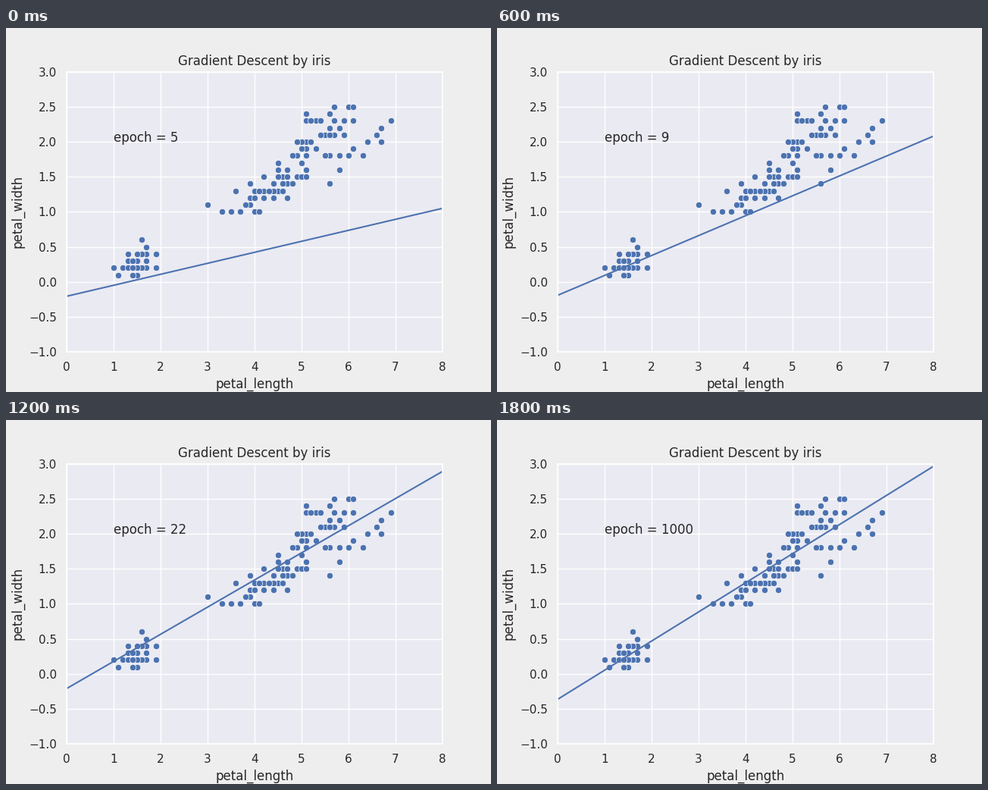
Recreate the animation shown at these times as a matplotlib script. Size 640 by 480 pixels, loop 2000 ms.

```python
import matplotlib.pyplot as plt
from matplotlib.animation import FuncAnimation

INK = "0.15"
BLUE = "#4C72B0"

plt.rcParams.update({
    "font.family": "DejaVu Sans",
    "font.size": 12,
    "axes.titlesize": 12,
    "axes.labelsize": 12,
    "xtick.labelsize": 11,
    "ytick.labelsize": 11,
    "text.color": INK,
    "axes.labelcolor": INK,
    "xtick.color": INK,
    "ytick.color": INK,
    "axes.facecolor": "#EAEAF2",
    "axes.edgecolor": "white",
    "axes.linewidth": 1.25,
    "axes.axisbelow": True,
    "axes.grid": True,
    "grid.color": "white",
    "grid.linestyle": "-",
    "grid.linewidth": 1,
    "lines.solid_capstyle": "round",
    "xtick.bottom": False,
    "ytick.left": False,
    "xtick.major.size": 6,
    "ytick.major.size": 6,
})

# Petal width -> petal lengths, both in tenths, in drawing order.
ROWS = {
    1: [11, 15, 14],
    2: [17, 10, 19, 12, 13, 16, 15, 14],
    3: [17, 15, 13, 14],
    4: [17, 13, 16, 15, 19],
    5: [17],
    6: [16],
    10: [40, 41, 35, 37, 33],
    11: [39, 38, 30],
    12: [47, 39, 44, 40, 42],
    13: [45, 46, 36, 44, 40, 42, 43, 41],
    14: [39, 47, 44, 48, 46, 56],
    15: [46, 42, 49, 45, 47, 50, 51],
    16: [47, 51, 45, 58],
    17: [50, 45],
    18: [56, 63, 58, 60, 49, 55, 48, 51],
    19: [53, 61, 51, 50],
    20: [51, 50, 49, 67, 64, 52],
    21: [59, 66, 55, 57, 56, 54],
    22: [58, 67, 56],
    23: [53, 69, 57, 61, 51, 59, 52, 54],
    24: [51, 56],
    25: [60, 61, 57],
}
EPOCHS = [5, 6, 7, 9, 14, 17, 22, 51, 92, 1000]

# Sample means of x, y, x*x and x*y, repeated measurements included.
MX, MY, MXX, MXY = 3.758, 1.199333, 17.218067, 5.794067
RATE = 0.1


def descend(epochs):
    """Slope and intercept after some steps of gradient descent."""
    w, b = 1.0, 0.0
    for _ in range(epochs):
        dw = w * MXX + b * MX - MXY
        db = w * MX + b - MY
        w, b = w - RATE * dw, b - RATE * db
    return w, b


fig, ax = plt.subplots(figsize=(6.4, 4.8), dpi=100, facecolor="#EEEEEE")
points = [(x / 10, y / 10) for y, xs in ROWS.items() for x in xs]
ax.scatter(*zip(*points), s=36, color=BLUE, edgecolor="white", linewidth=0.48)
line, = ax.plot([], [], color=BLUE, linewidth=1.5)
label = ax.text(1, 2, "")
ax.set(xlim=(0, 8), ylim=(-1, 3), xlabel="petal_length",
       ylabel="petal_width", title="Gradient Descent by iris")


def draw(i):
    w, b = descend(EPOCHS[i])
    line.set_data([0, 8], [b, 8 * w + b])
    label.set_text(f"epoch = {EPOCHS[i]}")
    return line, label


anim = FuncAnimation(fig, draw, frames=len(EPOCHS), interval=200,
                     repeat=True, repeat_delay=0)
plt.show()
```
